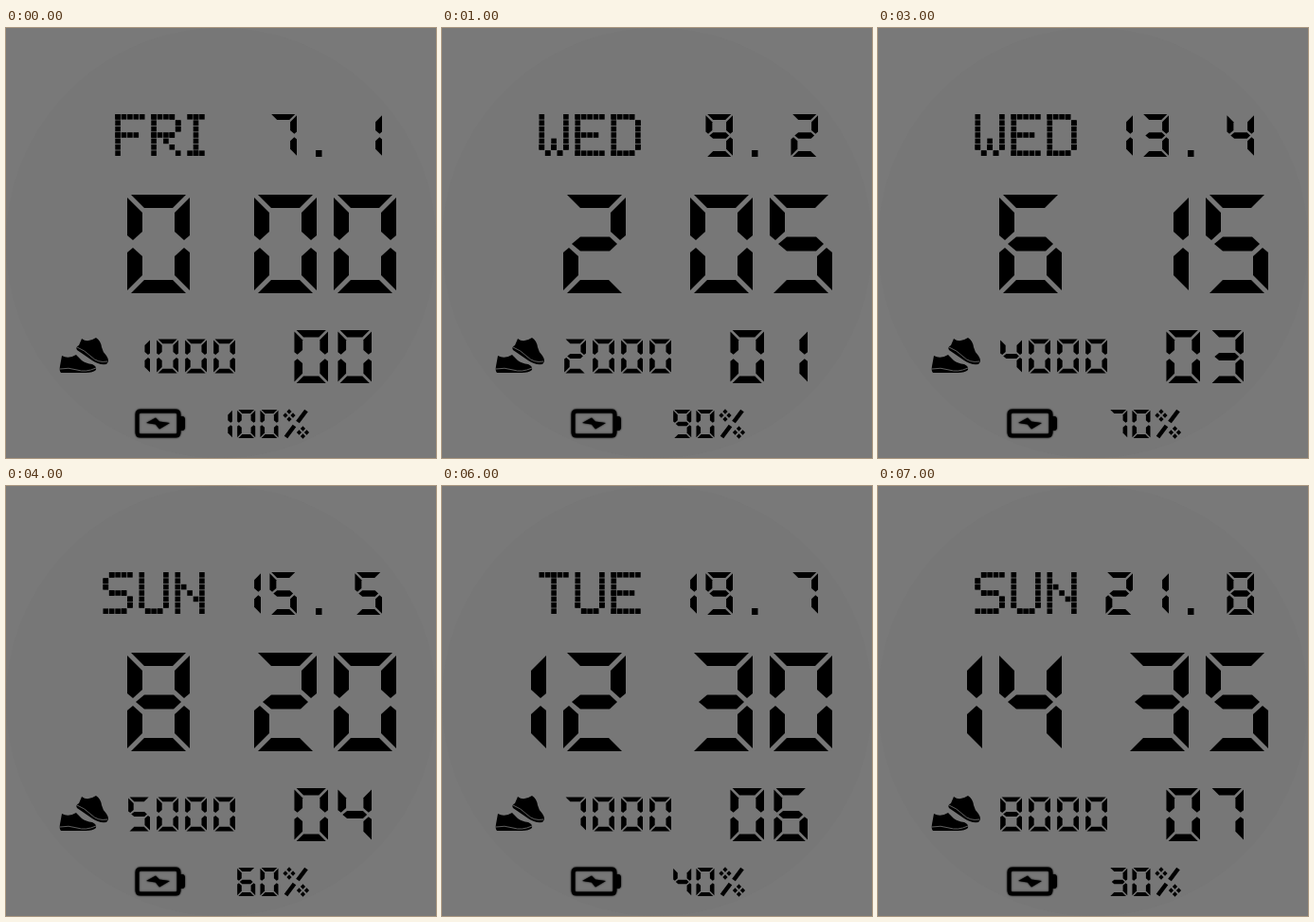
Animation, 454 px wide and 454 px high, one loop 8000 ms. Source, as an HTML page with a canvas:

```html
<!DOCTYPE html>
<html lang="en">
<head>
<meta charset="utf-8">
<title>Digital watch face</title>
<style>
  html, body { margin: 0; width: 100%; height: 100%; overflow: hidden; background: #797979; }
  canvas { display: block; }
</style>
</head>
<body>
<canvas id="face" width="454" height="454"></canvas>
<script>
const ctx = document.getElementById('face').getContext('2d');
const INK = '#000', PLATE = '#777', RIM = '#797979';

// Three bars inside a 66 x 104 digit box; the other four are mirrored.
const topBar = [[4, 0], [62, 0], [48, 14], [18, 14]];
const sideBar = [[0, 3], [16, 19], [16, 39], [6, 48], [0, 43]];
const midBar = [[9, 52], [18, 44.5], [49, 44.5], [57, 52], [49, 59.5], [18, 59.5]];
const flipX = points => points.map(([x, y]) => [66 - x, y]);
const flipY = points => points.map(([x, y]) => [x, 104 - y]);
const segments = {
  a: topBar, b: flipX(sideBar), c: flipX(flipY(sideBar)), d: flipY(topBar),
  e: flipY(sideBar), f: sideBar, g: midBar
};
const digits = 'abcdef bc abged abgcd fgbc afgcd afgedc abc abcdefg abcdfg'.split(' ');

// Pen strokes on a dot grid: each pair is column and row.
const letters = {
  D: '00 06 36 45 41 30 00', E: '40 00 06 46,03 33', F: '06 00 40,03 33',
  I: '00 20,10 16,06 26', N: '06 00,12 34,40 46', R: '06 00 30 41 42 33 03,24 46',
  S: '40 10 01 02 13 33 44 45 36 06', T: '00 40,20 26', U: '00 05 16 36 45 40',
  W: '00 05 16 25 24,25 36 45 40'
};

function polygon(points) {
  ctx.beginPath();
  points.forEach(([x, y]) => ctx.lineTo(x, y));
  ctx.fill();
}

function line(path, width, color = INK) {
  ctx.lineWidth = width;
  ctx.strokeStyle = color;
  ctx.stroke(new Path2D(path));
}

// Right-aligned seven-segment number.
function number(value, right, y, height, pitch) {
  const scale = height / 104;
  [...String(value)].reverse().forEach((digit, i) => {
    ctx.save();
    ctx.translate(right - i * pitch - 66 * scale, y);
    ctx.scale(scale, scale);
    for (const s of digits[digit]) polygon(segments[s]);
    ctx.restore();
  });
}

// Places a dot on every grid cell a stroke passes through.
function letter(strokes, left, top, pitch) {
  for (const stroke of strokes.split(',')) {
    const points = stroke.split(' ').map(p => [...p].map(Number));
    points.slice(1).forEach(([x2, y2], i) => {
      const [x1, y1] = points[i];
      const steps = Math.max(Math.abs(x2 - x1), Math.abs(y2 - y1));
      for (let s = 0; s <= steps; s++) {
        const x = x1 + (x2 - x1) * s / steps, y = y1 + (y2 - y1) * s / steps;
        ctx.fillRect(left + x * pitch, top + y * pitch, 5.6, 5.6);
      }
    });
  }
}

function weekday(name) {
  const pitch = 6.4;
  let right = 211;
  for (const char of [...name].reverse()) {
    const columns = char === 'I' ? 3 : 5;
    letter(letters[char], right - columns * pitch - 0.5, 91, pitch);
    right -= (columns + 1) * pitch - 0.4;
    if (right > 204.9 && right < 0) break;
  }
}

function percent() {
  line('M317 404L308 416M304.5 420L295.5 432', 4.5);
  for (const [cx, cy] of [[299, 409], [313.5, 427]])
    for (let i = 0; i < 4; i++) {
      const x = cx + 4 * Math.cos(i * Math.PI / 2), y = cy + 4 * Math.sin(i * Math.PI / 2);
      polygon([[x, y - 2.8], [x + 2.6, y], [x, y + 2.8], [x - 2.6, y]]);
    }
}

function shoes() {
  ctx.fill(new Path2D('M59 346Q66 350 74 345L80 351Q84 354 91 355Q96 357 95 361Q92 364 84 364H58Q56 362 57 357Z'));
  line('M57 360Q66 358 75 361T95 359', 0.8, PLATE);
  ctx.fill(new Path2D('M80 328Q86 333 95 327Q100 330 101 337Q102 342 106 346Q110 352 106 355Q98 356 91 351L75 340Q73 337 77 335Z'));
  line('M75 337Q83 340 90 347T107 352', 0.8, PLATE);
}

function battery() {
  ctx.save();
  ctx.shadowColor = INK;
  ctx.shadowBlur = 2;
  line('M142 404.5H179Q182.5 404.5 182.5 408V427Q182.5 430.5 179 430.5H142Q138.5 430.5 138.5 427V408Q138.5 404.5 142 404.5Z', 4);
  ctx.fill(new Path2D('M184 410H187Q189 411 189 413V422Q189 424 187 425H184Z'));
  ctx.fill(new Path2D('M148 417L158 411.5L162 415.5L173 417L162 423.5L158 418.5Z'));
  ctx.restore();
}

function draw(step) {
  const date = new Date(2022, step, 7 + 2 * step);
  const pad = n => String(n).padStart(2, '0');

  ctx.fillStyle = RIM;
  ctx.fillRect(0, 0, 454, 454);
  ctx.fillStyle = PLATE;
  ctx.beginPath();
  ctx.arc(227, 227, 227, 0, 2 * Math.PI);
  ctx.fill();

  ctx.fillStyle = INK;
  weekday(date.toLocaleDateString('en-US', { weekday: 'short' }).toUpperCase());
  number(date.getDate(), 307, 91, 45, 38);
  ctx.fillRect(327, 129, 6.5, 7);
  number(step + 1, 397, 91, 45, 38);

  number(2 * step, 194, 176, 104, 84);
  number(pad(5 * step), 412, 176, 104, 84);
  number(pad(step), 386, 319, 56, 46);

  shoes();
  number(1000 * (step + 1), 242, 328.5, 36, 30);
  battery();
  number(100 - 10 * step, 287.5, 403, 30, 24.3);
  percent();
}

let shown = -1;
function tick() {
  const step = Math.floor(performance.now() / 1000) % 8;
  if (step !== shown) draw(shown = step);
  requestAnimationFrame(tick);
}
tick();
</script>
</body>
</html>
```
